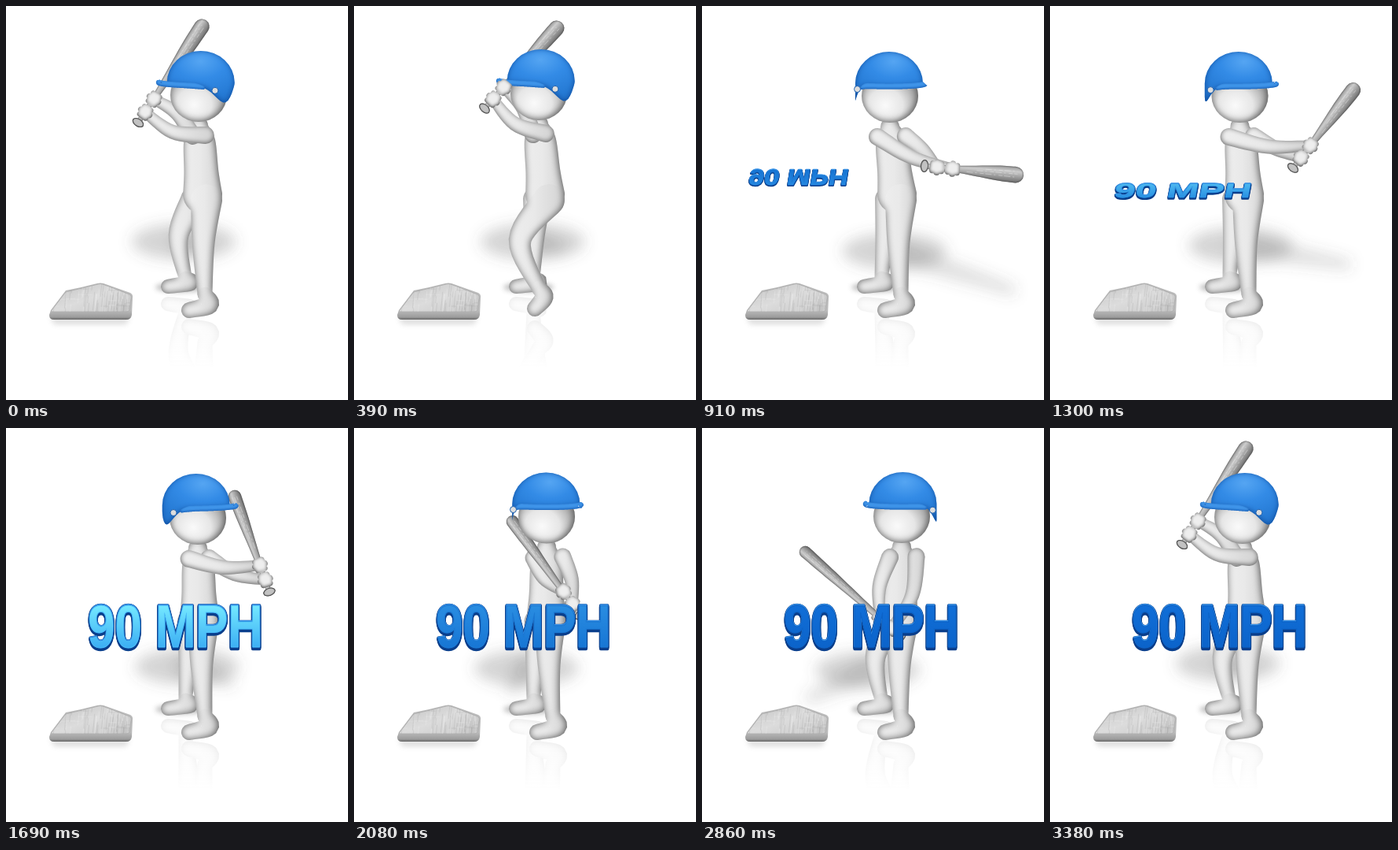
Write an HTML page that moves like this. It is 435 px wide and 500 px high and loops after 8 s.

```html
<!DOCTYPE html>
<html lang="en">
<head>
<meta charset="utf-8">
<title>90 MPH</title>
<style>
html, body { margin: 0; width: 100%; height: 100%; overflow: hidden; background: #fff; }
svg { display: block; width: 100vw; height: 100vh; }
text { font: bold 76px "Liberation Sans", Arial, sans-serif; text-anchor: middle; stroke-linejoin: round; }
</style>
</head>
<body>
<svg viewBox="0 0 435 500">
  <defs id="defs">
    <linearGradient id="skin"><stop stop-color="#eee"/><stop offset=".45" stop-color="#e9e9e9"/><stop offset="1" stop-color="#d2d2d2"/></linearGradient>
    <radialGradient id="face" cx=".42" cy=".68" r=".62"><stop stop-color="#fafafa"/><stop offset=".5" stop-color="#e6e6e6"/><stop offset="1" stop-color="#9a9a9a"/></radialGradient>
    <radialGradient id="shell" cx=".55" cy=".2" r=".75"><stop stop-color="#55a5f2"/><stop offset=".45" stop-color="#338be6"/><stop offset="1" stop-color="#2478d2"/></radialGradient>
    <linearGradient id="metal" x2=".1" y2="1"><stop stop-color="#8a8a8a"/><stop offset=".4" stop-color="#ccc"/><stop offset="1" stop-color="#777"/></linearGradient>
    <linearGradient id="slab" x2="1" y2="1"><stop stop-color="#c4c4c4"/><stop offset=".5" stop-color="#dcdcdc"/><stop offset="1" stop-color="#c8c8c8"/></linearGradient>
    <linearGradient id="side" x2="0" y2="1"><stop offset=".75" stop-color="#bbb"/><stop offset=".93" stop-color="#9c9c9c"/><stop offset="1" stop-color="#666"/></linearGradient>
    <linearGradient id="blue" x2="0" y2="1"><stop stop-color="#1272dc"/><stop offset="1" stop-color="#0a60c6"/></linearGradient>
    <linearGradient id="sky" x2="0" y2="1"><stop offset=".2" stop-color="#74e8ff"/><stop offset=".8" stop-color="#3db0f4"/></linearGradient>
    <linearGradient id="fade" gradientUnits="userSpaceOnUse" x1="0" y1="365" x2="0" y2="460"><stop stop-color="#fff"/><stop offset=".5" stop-color="#bbb"/><stop offset="1" stop-color="#000"/></linearGradient>
    <mask id="floor" maskUnits="userSpaceOnUse" x="0" y="365" width="435" height="100"><rect y="365" width="435" height="100" fill="url(#fade)"/></mask>
    <clipPath id="top"><path d="M118 353 L123 353 159 367 156 388 58 388 77 362Z"/></clipPath>
    <filter id="haze" filterUnits="userSpaceOnUse" x="0" y="200" width="435" height="300"><feGaussianBlur stdDeviation="9"/></filter>
    <filter id="near" filterUnits="userSpaceOnUse" x="0" y="330" width="435" height="120"><feGaussianBlur stdDeviation="3"/></filter>
  </defs>

  <g filter="url(#haze)" fill="#555">
    <ellipse id="blob" rx="66" ry="23" opacity=".25"/>
    <path id="cast" opacity=".18"/>
  </g>
  <g mask="url(#floor)" opacity=".15">
    <use href="#back" transform="matrix(1 0 0 -1 0 734)"/>
    <use href="#body" transform="matrix(1 0 0 -1 0 793)"/>
  </g>

  <path d="M56 396 H158 L152 404 H62Z" fill="#777" opacity=".25" filter="url(#near)"/>
  <path d="M57 386 L76 361 Q97 357 116 352 Q120 351 124 352 L158 364 Q162 366 161 371 L160 392 Q159 398 153 398 H61 Q55 398 55 392Z" fill="url(#side)"/>
  <path d="M117 353 Q120 352 123 353 L157 366 Q160 367 159 371 L157 386 Q156 388 153 388 H60 Q56 388 59 385 L75 364 Q77 362 80 362Z" fill="url(#slab)" stroke="#aaa" stroke-width=".8"/>
  <g id="grain" clip-path="url(#top)" stroke-width=".7"></g>

  <ellipse cx="222" cy="357" rx="32" ry="6" fill="#555" opacity=".4" filter="url(#near)"/>
  <g id="back" filter="url(#soft)" fill="url(#skin)"><path id="legB"/><path id="footB"/></g>
  <g id="body" filter="url(#soft)" fill="url(#skin)"><path id="torso"/><path id="legN"/><path id="footN"/></g>
  <g id="arms" fill="url(#skin)"><g id="gR" filter="url(#limb)"><path id="armR"/></g><g id="gL" filter="url(#limb)"><path id="armL"/></g></g>
  <g filter="url(#steel)"><g id="bat">
    <path id="wood" fill="url(#metal)"/>
    <path id="brush" fill="none" stroke="#eee" stroke-width=".8" stroke-dasharray="8 3 2 4 5 2" opacity=".5"/>
    <ellipse rx="4.5" ry="7.5" fill="#c2c2c2" stroke="#555"/>
  </g></g>
  <g id="head">
    <ellipse cy="-3" rx="36" ry="34" fill="url(#face)" filter="url(#ball)"/>
    <path id="helmet" fill="url(#shell)" filter="url(#plastic)"/>
    <path id="brim" fill="#3f95ea" filter="url(#rim)"/>
    <g id="ears" fill="#ddd" stroke="#1c5fae"><circle r="4"/><circle r="4"/></g>
  </g>
  <g filter="url(#grip)" fill="#eee"><path id="handR"/><path id="handL"/></g>

  <g id="sign"></g>
</svg>
<script>
const NS = 'http://www.w3.org/2000/svg';
const $ = id => document.getElementById(id);
const set = (el, attrs) => { for (const k in attrs) el.setAttribute(k, attrs[k]); };
const add = (parent, tag, attrs) => {
  const el = document.createElementNS(NS, tag);
  set(el, attrs);
  parent.append(el);
  return el;
};
const draw = (id, d) => $(id).setAttribute('d', d);
const rad = deg => deg * Math.PI / 180;
const clamp = (v, lo, hi) => Math.max(lo, Math.min(hi, v));
const mix = (a, b, u) => a.map((v, i) => v + (b[i] - v) * u);

// Inner shading: darkens a shape towards its edges.
function shade(id, color, blur, dx, dy, local) {
  const f = add($('defs'), 'filter', {
    id, filterUnits: 'userSpaceOnUse', x: local ? -80 : 0, y: local ? -80 : 0,
    width: local ? 160 : 435, height: local ? 160 : 500, 'color-interpolation-filters': 'sRGB'
  });
  add(f, 'feGaussianBlur', { in: 'SourceAlpha', stdDeviation: blur });
  add(f, 'feOffset', { dx, dy, result: 'b' });
  add(f, 'feFlood', { 'flood-color': color });
  add(f, 'feComposite', { operator: 'out', in2: 'b' });
  add(f, 'feComposite', { operator: 'in', in2: 'SourceAlpha', result: 's' });
  const m = add(f, 'feMerge', {});
  add(m, 'feMergeNode', { in: 'SourceGraphic' });
  add(m, 'feMergeNode', { in: 's' });
}
shade('soft', '#505050', 5, -1, -.5);
shade('limb', '#585858', 3.2, -.5, -1.5);
shade('steel', '#333', 1.2, 0, 0);
shade('grip', '#333', 2, -.3, -.8);
shade('ball', '#555', 4, -1, -1, true);
shade('plastic', '#0f4c9c', 3, -.5, -1, true);
shade('rim', '#1256ad', 1.4, 0, -1, true);

// frame, head x y, hip x, head turn, heel lift, back knee bend, bat knob x y, bat angle, bat length
const POSES = [
  [0, 245, 116, 250, -65, 0, 15, 168, 148, -56.4, 156],
  [3, 235, 114, 243, -65, 1, 1, 166, 130, -48, 147],
  [5, 237, 115, 245, -20, .4, 1, 188, 196, -184, 165],
  [7, 239, 117, 248, 20, 0, 0, 283, 203, -354.5, 132],
  [13, 244, 117, 246, 48, 0, 0, 335, 208, -470, 137],
  [19, 246, 114, 243, -20, 0, 1, 240, 266, -502, 171],
  [22, 254, 115, 250, -28, 0, 14, 253, 265, -498.5, 170]
];
const LAST = 26;
const ready = [...POSES[0]];
ready[0] = LAST;
ready[9] -= 360;
POSES.push(ready);

function poseAt(f) {
  const i = clamp(POSES.findIndex(p => p[0] > f), -1, 99);
  if (i < 0) return ready;
  const a = POSES[i - 1], b = POSES[i];
  return mix(a, b, (f - a[0]) / (b[0] - a[0]));
}

const fix = v => v.toFixed(2);
const spline = (a, b, c, d, u) =>
  b + u * (c - a + u * (2 * a - 5 * b + 4 * c - d + u * (3 * (b - c) + d - a))) / 2;

// Tapered round tube through points with one radius each.
function tube(points, radii) {
  const p = points.map((q, i) => [...q, radii[i]]);
  const n = p.length - 1, steps = 8, mid = [];
  const pick = i => p[clamp(i, 0, n)];
  for (let i = 0; i <= n * steps; i++) {
    const s = Math.min(n - 1, Math.floor(i / steps)), u = i / steps - s;
    mid.push([0, 1, 2].map(k => spline(pick(s - 1)[k], pick(s)[k], pick(s + 1)[k], pick(s + 2)[k], u)));
  }
  const l = [], r = [];
  mid.forEach(([x, y, w], i) => {
    const a = mid[Math.max(0, i - 1)], b = mid[Math.min(mid.length - 1, i + 1)];
    const dx = b[0] - a[0], dy = b[1] - a[1], h = Math.hypot(dx, dy) || 1;
    l.push(fix(x + dy / h * w) + ' ' + fix(y - dx / h * w));
    r.unshift(fix(x - dy / h * w) + ' ' + fix(y + dx / h * w));
  });
  const r0 = radii[0], r1 = radii[n];
  return `M${l.join('L')}A${r1} ${r1} 0 0 1 ${r.join('L')}A${r0} ${r0} 0 0 1 ${l[0]}Z`;
}

function leg(side, hip, ankle, heel, toe, bend, w) {
  const [kx, ky] = mix(hip, ankle, .46);
  draw('leg' + side, tube([hip, [kx - bend, ky], ankle], [w, w * .72, w * .47]));
  draw('foot' + side, tube([ankle, heel, toe], [w * .47, w * .58, w * .5]));
}

// The elbow leaves the straight line from shoulder to hand by the bend.
function arm(side, shoulder, hand, bend, dir) {
  const [x, y] = hand, [mx, my] = mix(shoulder, hand, .5);
  const dx = x - shoulder[0], dy = y - shoulder[1], h = Math.hypot(dx, dy);
  const elbow = [mx - dy / h * bend, my + dx / h * bend];
  draw('arm' + side, tube([shoulder, elbow, hand], [11, 9, 6.5]));
  const c = Math.cos(dir), s = Math.sin(dir);
  draw('hand' + side, [-5.5, 0, 5.5].map(o => {
    const px = x + c * o, py = y + s * o, w = 6.5 - Math.abs(o) * .4;
    return tube([[px - s * w, py + c * w], [px + s * w, py - c * w]], [4, 3.6]);
  }).join(''));
}

// Helmet rim seen at screen angle a: brim in front, flaps over the ears.
function helmet(turn) {
  const shift = -3 * Math.sin(rad(turn));
  const rim = a => {
    const phi = (a - turn + 540) % 360 - 180;
    const brim = Math.max(0, Math.cos(rad(phi))) ** 2;
    const flap = Math.exp(-(((Math.abs(phi) - 110) / 28) ** 2));
    return [shift + (43 + 12 * brim) * Math.sin(rad(a)), -20 + 5 * Math.cos(rad(a)) + 23 * flap];
  };
  const edge = [];
  for (let a = -90; a <= 90; a += 6) edge.push(rim(a).map(fix).join(' '));
  draw('helmet', `M${edge.join('L')}L${shift + 43} -19A43 40 0 0 0 ${shift - 43} -19Z`);

  const front = [];
  for (let a = Math.max(-92, turn - 72); a <= Math.min(92, turn + 72); a += 12) front.push(rim(a));
  draw('brim', tube(front, front.map((_, i) => i % (front.length - 1) ? 3.6 : 2.2)));

  [...$('ears').children].forEach((dot, i) => {
    const a = turn + (i ? 90 : -90), [, y] = rim(a);
    set(dot, { cx: shift + 43 * Math.sin(rad(a)), cy: y - 7, opacity: Math.cos(rad(a)) > .15 ? 1 : 0 });
  });
}

// Sign layers: extruded sides, light bevel, face, flash.
const layers = [2.5, 1.5, .5].map(o => ({ o, fill: '#0a3f8c', stroke: '#0a3f8c', 'stroke-width': 4.5 }));
layers.push({ o: -.6, fill: '#4aa5f0', stroke: '#3b94e8', 'stroke-width': 2 });
layers.push({ o: .4, fill: 'url(#blue)', stroke: '#0c63c8', 'stroke-width': 1.4 });
layers.push({ o: .3, fill: 'url(#sky)', stroke: '#4fc0f8', 'stroke-width': 1 });
const words = layers.map(({ o, ...look }) => {
  const el = add($('sign'), 'text', { y: 26, ...look });
  el.textContent = '90 MPH';
  return { el, o };
});
const shine = words[words.length - 1].el;

// Flips over while it grows, flashes on arrival and settles.
function sign(f) {
  $('sign').style.display = f < 6 ? 'none' : '';
  const u = Math.min(1, (f - 7) / 6);
  const [x, y, size, deg] = mix([123, 217, .57, 230], [215.5, 251.5, 1, 360], u);
  const a = rad(deg);
  for (const { el, o } of words)
    el.setAttribute('transform', `translate(${x} ${y + o * size}) skewX(${12 * Math.sin(a)}) scale(${size * .81} ${size * Math.cos(a)})`);
  shine.setAttribute('opacity', clamp(f < 13 ? .2 + u * .8 : 1 - (f - 13) / 4, 0, 1));
}

function pose(f) {
  const [, hx, hy, hipX, turn, lift, knee, kx, ky, deg, reach] = poseAt(f);
  const dir = rad(deg), c = Math.cos(dir), s = Math.sin(dir);
  const len = reach * (1 - .4 * Math.max(0, s));
  const along = d => [kx + c * d, ky + s * d];

  const neck = [hx, hy + 36], hip = [hipX, 239];
  draw('torso', tube([neck, mix(neck, hip, .22), mix(neck, hip, .68), hip], [12, 20, 22, 25]));
  leg('N', [hipX + 5, 246], [253 - 18 * lift, 366 - 8 * lift], [259 - 17 * lift, 379 - 10 * lift],
    [233 - 3 * lift, 386 - 2 * lift], 3 + 28 * lift, 20);
  leg('B', [hipX - 10, 246], [228, 345], [235, 351], [206, 356], knee, 18);

  const open = Math.cos(rad(turn));
  arm('L', [hx + 21 * open, hy + 48], along(16), -11 + 24 * Math.max(0, Math.sin(rad(turn))), dir);
  arm('R', [hx - 17 * open, hy + 49], along(36), 7, dir);
  $('arms').append($(f > 4 && f < 24 ? 'gR' : 'gL'));

  const r = 8.8 + 1.5 * c;
  set($('bat'), { transform: `translate(${kx} ${ky}) rotate(${deg})` });
  draw('wood', tube([[0, 0], [len * .3, 0], [len * .72, 0], [len - r, 0]], [3.2, 4, r - 1, r]));
  draw('brush', [-.45, -.1, .3].map(k => `M${len * (.5 - k / 4)} ${k * r * .7}L${len - 8} ${k * r}`).join(''));

  set($('head'), { transform: `translate(${hx} ${hy})` });
  helmet(turn);

  // The floor shadow follows the bat tip.
  const [tx, ty] = along(len);
  const cx = 225 + (tx - 245) * .12, cy = 298 + ty * .06;
  set($('blob'), { cx, cy });
  draw('cast', tube([[cx, cy], [245 + (tx - 245) * .9, 300 + ty * .28]], [16, 7]));
  sign(f);
}

// Brushed surface of the plate
let seed = 7;
const rnd = () => (seed = seed * 16807 % 2147483647) / 2147483647;
for (let i = 0; i < 120; i++) {
  const x = 56 + rnd() * 106, y = 346 + rnd() * 38, n = 6 + rnd() * 20;
  add($('grain'), 'path', {
    d: i % 5 ? `M${x} ${y}l${-n * .1} ${n}` : `M${x} ${y}h${n}`,
    stroke: rnd() < .5 ? '#fff' : '#888', opacity: .25
  });
}

const STEP = 130, LOOP = 8000;
const start = performance.now();
let shown = -1;
function tick() {
  const t = (performance.now() - start) % LOOP;
  const f = Math.min(LAST, Math.floor(t / STEP));
  if (f !== shown) pose(shown = f);
  requestAnimationFrame(tick);
}
tick();
</script>
</body>
</html>
```
